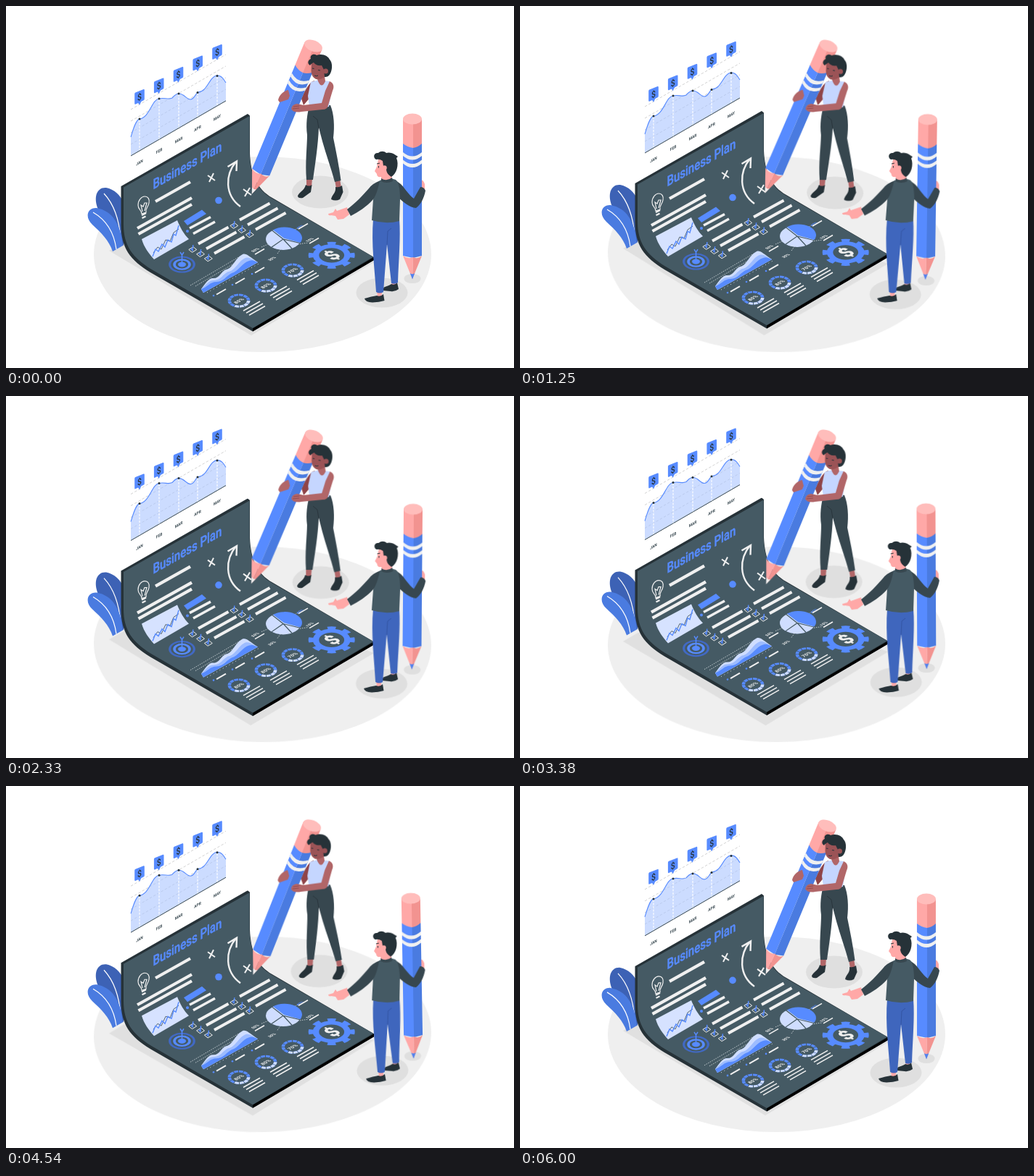
Recreate the animation shown at these times as an HTML page without scripts. Size 700x500 px, loop 6040 ms.

```html
<!DOCTYPE html>
<html lang="en">
<head>
<meta charset="utf-8">
<title>Business Plan</title>
<style>
html, body { margin: 0; width: 100%; height: 100%; overflow: hidden; background: #fff; }
svg { display: block; width: 700px; height: 500px; }
text { font-family: Roboto, "Liberation Sans", sans-serif; }
.blue { fill: #578bff; }
.deep { fill: #4a7be0; }
.pale { fill: #cfddff; }
.dark { fill: #263238; }
.slate { fill: #37474f; }
.skin { fill: #ffa8a7; }
.brown { fill: #b16668; }
.shade { fill: #dfdfdf; }
.ln { fill: none; stroke: #f0f0f0; }
.bl { fill: none; stroke: #578bff; }
.float { animation: float 6.04s linear infinite; }
.sway { animation: sway 6.04s linear infinite; }
#floor { transform-origin: 353.5px 343px; }
#woman { transform-origin: 405px 163px; }
#man { transform-origin: 512px 282px; }
@keyframes float { 50% { transform: translateY(-9.6px); } }
@keyframes sway { 25% { transform: rotate(1deg); } 75% { transform: rotate(-1deg); } }
</style>
</head>
<body>
<svg viewBox="0 0 700 500">
<defs>
  <g id="badge">
    <path class="blue" d="M-6.8-4.5Q-6.8-6-5.6-6.6L5.6-11Q6.8-11.300 6.800-10V2.300Q6.800 3.600 5.700 4.200L2.400 6 0 10.800-2 8-5.600 9.700Q-6.800 10.200-6.800 8.800Z"/>
    <text class="dark" transform="matrix(.866 -.4 0 1 0 4)" font-size="12" font-weight="500" text-anchor="middle">$</text>
  </g>
  <g id="pencil">
    <path fill="#ffa8a7" d="M-13 0H2V41Q-6 40-13 35Z"/>
    <path fill="#f29390" d="M1 0H13V35Q8 40 1 41Z"/>
    <ellipse rx="13" ry="7.6" fill="#ffbdbb"/>
    <path class="blue" d="M-13 34Q-7 39 1 40V192L-13 189Z"/>
    <path class="deep" d="M1 40Q8 39 13 34V189L1 192Z"/>
    <path id="band" fill="#f0f0f0" d="M-13 46Q0 57 13 46V51Q0 62-13 51Z"/>
    <use href="#band" y="10.5"/>
    <path fill="#ffa8a7" d="M-13 189Q-6 194 1 191L0 221Z"/>
    <path fill="#f29390" d="M1 191Q8 194 13 189L0 221Z"/>
    <path fill="currentColor" d="M-3.200 213Q0 215.500 3.200 213L0 221.500Z"/>
  </g>
  <g id="tick">
    <path class="ln" d="M-5.200 .5 1-3.300 5.700.5-.5 4.300Z"/>
    <path class="bl" stroke-width="1.500" d="M-2.500-1 0 1.500 .800-6"/>
  </g>
  <g id="checks">
    <use href="#tick"/><use href="#tick" x="10.800" y="6.200"/><use href="#tick" x="21.600" y="12.400"/>
    <path class="ln" stroke-width="4" d="M8-7.500 49.500-30.500M19-.8 60.500-23.800M30 5.700 71.500-17.300"/>
  </g>
  <g id="ring" transform="scale(1 .61)" fill="none" stroke-width="4.500">
    <circle r="13.200" stroke="#578bff" pathLength="12" stroke-dasharray=".85 .15"/>
    <circle r="13.200" stroke="#cfddff" pathLength="12" stroke-dasharray=".85 .15 .85 .15 .85 .15 .85 8.150"/>
  </g>
  <path id="notes" class="ln" stroke-width="1.500" d="M6 14 29 1M10 17 33 4M14 20 36 7.500"/>
  <g id="legend">
    <circle r="1.300" class="blue"/>
    <path class="ln" stroke-width="2" d="M4-1.500 17-9"/>
  </g>
</defs>

<g id="floor" class="sway">
  <ellipse cx="353.500" cy="343" rx="232.500" ry="135" fill="#efefef"/>
  <path fill="#e0e0e0" d="M142 338 161 327 300 270 507 354 338 455Z"/>
  <ellipse class="shade" cx="433" cy="257" rx="39" ry="22.500"/>
  <ellipse class="shade" cx="518" cy="396" rx="35.500" ry="20.500"/>
  <ellipse class="shade" cx="560" cy="376.500" rx="11.500" ry="6.600"/>
</g>

<g class="float">
  <!-- line chart -->
  <path fill="none" stroke="#cdcdcd" stroke-width=".9" stroke-dasharray="3.500 2.500" d="M172 191 303 115M172 175 303 99M172 159 303 83M172 143 303 67"/>
  <path fill="#aac5ff" fill-opacity=".6" d="M172 181C175 171 179 157 184 156 198 154 201 129 211 128 218 126 224 130 229 127 232 124 234 121 238 121 246 121 248 129 254 129 260 129 261 120 265 119 278 118 280 97 291 96 297 96 300 101 303 106V131L172 207Z"/>
  <path class="bl" stroke-width="1.100" d="M172 181C175 171 179 157 184 156 198 154 201 129 211 128 218 126 224 130 229 127 232 124 234 121 238 121 246 121 248 129 254 129 260 129 261 120 265 119 278 118 280 97 291 96 297 96 300 101 303 106"/>
  <path fill="none" stroke="#37474f" d="M172 207 303 131"/>
  <path fill="none" stroke="#fff" stroke-width="1.100" stroke-dasharray="3 1.500" d="M184 157V199M211 129V184M238 122V168M264 120V153M291 98V137"/>
  <g class="dark">
    <circle cx="184" cy="156" r="1.500"/><circle cx="211" cy="128" r="1.500"/><circle cx="238" cy="121" r="1.500"/><circle cx="264" cy="119.500" r="1.500"/><circle cx="291" cy="96.500" r="1.500"/>
  </g>
  <use href="#badge" x="184" y="126"/><use href="#badge" x="210.700" y="110.500"/><use href="#badge" x="237.500" y="95"/><use href="#badge" x="264.200" y="79.500"/><use href="#badge" x="291" y="64"/>
  <g class="slate" font-size="5.600" font-weight="700" text-anchor="middle">
    <text transform="matrix(.866 -.5 0 1 184 218)">JAN</text>
    <text transform="matrix(.866 -.5 0 1 211 202)">FEB</text>
    <text transform="matrix(.866 -.5 0 1 238 187)">MAR</text>
    <text transform="matrix(.866 -.5 0 1 264 171)">APR</text>
    <text transform="matrix(.866 -.5 0 1 291 156)">MAY</text>
  </g>

  <!-- leaves -->
  <path fill="#3d62b5" d="M162 331C145 318 137 301 127 281 120 264 125 250 138 251 149 253 158 261 164 275Z"/>
  <path fill="none" stroke="#fff" stroke-width="1.200" d="M135 259C149 274 156 294 158 322"/>
  <path class="deep" d="M147 339C142 324 131 313 119 302 108 292 112 278 125 279 146 283 158 300 161 331Z"/>
  <path fill="none" stroke="#fff" stroke-width="1.200" d="M120 285C139 296 149 314 152 336"/>

  <!-- sheet -->
  <path class="dark" d="M158.500 249 333 149 336 151.500V203C337 233 346 253 367 265L507 347V351L340 449.500 199 368C171 351 158.500 334 158.500 302Z"/>
  <path d="M340 445 507 347V351L340 449.500Z"/>
  <path fill="#455a64" d="M162 250.500 335.500 152V203C336.500 233 345 253 366 265.500L506 346.500 340 445 200 363.500C174 347 162 331 162 302Z"/>

  <text class="blue" stroke="#578bff" stroke-width=".5" transform="matrix(.78 -.44 0 1 202.500 253.500)" font-size="19.200" font-weight="500">Business Plan</text>
  <g class="ln" stroke-width="1.200">
    <path d="M187 287C187 281 182 282 182 275 182 268 187 263 191 263 196 263 198 267 197 272 196 278 192 279 193 285ZM188 284 186 275 189 277 191 272 194 272 191 283"/>
    <path stroke-width="2.200" d="M187 289 193 286M187.500 293 192.500 290.500"/>
    <path stroke-width="4.200" d="M206 270 254 243M181 307 256 265M182.500 315 256 274"/>
    <path stroke-width="2" d="M278 234 288 241M286 231 280 243M327 253 338 261M336 251 329 263"/>
    <path stroke-width="2.400" d="M323 277C301 261 302 233 317 215M305.500 222 318 214.500 317.500 228"/>
  </g>
  <circle class="blue" cx="293" cy="268.500" r="4.800"/>

  <path fill="#d6e2ff" d="M187 322 236 296C240 306 245 315 252 322L204 350C197 342 190 333 187 322Z"/>
  <path fill="none" stroke="#37474f" stroke-width=".8" d="M203 341 209 333 214 336 220 323 226 325 231 313 238 308"/>
  <path class="bl" stroke-width="1.400" d="M202 346 206 336 210 339 215 329 219 333 223 323 228 326 231 315 234 317 238 303"/>

  <path class="blue" d="M245 297 270 281.500 276 287 250 303Z"/>
  <circle class="blue" cx="250" cy="311" r="2"/>
  <path class="ln" stroke-width="3.500" d="M253 307 282 291.500M258 314.500 288 298"/>
  <use href="#checks" x="257" y="336"/>
  <use href="#checks" x="314" y="303"/>

  <g transform="translate(242.500 357) scale(1 .63)">
    <circle r="16.800" fill="none" stroke="#4169c4" stroke-width="3.200"/>
    <circle r="10.500" class="bl" stroke-width="3.600"/>
    <circle r="5.500" class="blue"/>
  </g>
  <path class="bl" stroke-width="1.500" d="M242.500 357V343M240 340 242.500 344 245 340"/>

  <path fill="none" stroke="#dfe5e8" stroke-width=".8" stroke-dasharray="1.500 1.500" d="M254 386 322 346M261 387 324 350"/>
  <path class="pale" d="M269 391C275 383 279 376 285 376 294 377 296 367 303 364 312 363 315 349 326 343 331 341 335 346 347 354L272 396Z"/>
  <path fill="#9dbcff" d="M269 391C276 385 279 379 286 379 296 379 299 370 306 367 316 366 321 351 330 348 336 346 340 351 347 354L272 396Z"/>
  <path class="blue" d="M269 391C278 388 281 381 290 381 300 381 304 372 311 369 320 367 326 354 335 352 340 350 343 353 347 354L272 396Z"/>
  <path fill="none" stroke="#dfe5e8" stroke-dasharray="1 4" d="M277 396 350 355"/>
  <use href="#legend" x="286" y="400"/><use href="#legend" x="312" y="385"/><use href="#legend" x="339" y="370"/>

  <path fill="none" stroke="#dfe5e8" stroke-width=".8" stroke-dasharray="1.500 1.500" d="M352 333 368 326M374 342 384 328M398 309 404 306M396 330 416 327"/>
  <g transform="translate(382 322) scale(1 .62)">
    <circle r="24" class="pale"/>
    <path class="blue" d="M1-2-14-20.500A24 24 0 0 1 23.500 8Z"/>
    <path fill="none" stroke="#455a64" stroke-width="1.600" d="M-15-19 0 0 23 9M0 0-16 18M0 0 12 21"/>
  </g>
  <g font-size="6" font-weight="700" text-anchor="middle" fill="#f0f0f0">
    <text transform="matrix(.8 -.46 .75 .43 345 338)">50%</text>
    <text transform="matrix(.8 -.46 .75 .43 368 350)">30%</text>
    <text transform="matrix(.8 -.46 .75 .43 420 324)">10%</text>
    <text class="blue" transform="matrix(.8 -.46 .75 .43 407 306)">40%</text>
  </g>
  <path class="ln" stroke-width="1.600" d="M343 343 356 335.500M418 328 431 320.500M403 308 416 300.500"/>

  <use href="#ring" transform="translate(321 407)"/>
  <use href="#ring" transform="translate(358 386)"/>
  <use href="#ring" transform="translate(395 365)"/>
  <g font-size="7.500" font-weight="700" text-anchor="middle" fill="#f0f0f0">
    <text transform="matrix(.8 -.46 .75 .43 323 408.500)">80%</text>
    <text transform="matrix(.8 -.46 .75 .43 360 387.500)">80%</text>
    <text transform="matrix(.8 -.46 .75 .43 397 366.500)">70%</text>
  </g>
  <use href="#notes" x="321" y="407"/><use href="#notes" x="358" y="386"/><use href="#notes" x="395" y="364.500"/>

  <g transform="translate(448.700 344.300) scale(1 .58)" class="bl">
    <circle r="21.700" stroke-width="8.600"/>
    <circle r="28.500" stroke-width="7" pathLength="16" stroke-dasharray="1 1" stroke-dashoffset=".5"/>
  </g>
  <text transform="matrix(.75 -.43 .75 .43 456.500 348.500)" font-size="28" font-weight="700" stroke="#f0f0f0" stroke-width=".6" text-anchor="middle" fill="#f0f0f0">$</text>
</g>

<g id="woman" class="sway">
  <path fill="#8f4448" d="M425 103C417 105 411 119 407 128L410 137 421 124Z"/>
  <use href="#pencil" transform="translate(423.500 55) rotate(22.500)" color="#f0f0f0"/>
  <path class="brown" d="M389 116C383 117 376 123 375 130L377 133 383 131 389 129 391 124Z"/>
  <path class="brown" d="M414 238H422L421 250H414ZM453 240 460 239 462 251 455 252Z"/>
  <path class="dark" d="M413 247Q417 250 421.500 247L420 257 409 265Q402 266 402 262C405 256 411 255 413 247ZM454 250Q459 251 463 248L464.500 257 460 267Q454 270 448 267C449 260 455 259 454 250Z"/>
  <path class="slate" d="M418 138 447 137C452 149 453 166 451 182 455 202 459 221 461.500 241L453 243C448 224 441 205 436 187L431 168C430 193 426 218 423 240L414 240C412 217 415 193 415 178 413 163 415 149 418 138Z"/>
  <path fill="none" stroke="#263238" stroke-width=".8" d="M431 169 429 157 423 152"/>
  <path fill="#c5d6ff" d="M420 105 431 102 446 104 448 119 445 139Q431 143 418 139L416 124Z"/>
  <path class="brown" d="M428 97H439L440 104Q435 115 430 104ZM446 104C451 106 453 111 450 117L444 137Q443 143 436 143L407 146Q396 148 393 142 394 136 401 135L410 137 435 134 440 117Z"/>
  <path fill="none" stroke="#8f4448" stroke-width=".8" d="M396 139 404 138M395 142 404 141"/>
  <path fill="#9b5356" d="M421 77 439 77 441 96Q434 103 427 101 421 98 420.500 90Z"/>
  <path class="dark" d="M419 82C414 79 417 74 420 73 418 68 424 65 428 68 436 65 444 69 446 74 450 78 450 87 447 93 445 97 443 98 439 98L438 88C437 86 436 84 435 82 430 83 426 81 424 78 422 79 420 80 419 82Z"/>
  <circle cx="440.500" cy="90" r="3.500" fill="#9b5356"/>
  <path fill="none" stroke="#263238" d="M422 86 424.500 86.500M430 88.500 433 89M425 96Q428 97.500 430 96"/>
</g>

<g id="man" class="sway">
  <path class="skin" d="M570 240Q575 239 577 246L577 254 568 255Z"/>
  <use href="#pencil" x="560" y="156" color="#4f82ef"/>
  <path class="skin" d="M511 394H518V402H512ZM531 380H538L539 387 532 388Z"/>
  <path class="dark" d="M511 400Q516 402 520 398L521.500 407Q514 409 505 409.500 495 409 494 404 504 401 511 400ZM531 384Q536 386 539 382L541 391Q536 395 530 394L519 393C518 387 526 388 531 384Z"/>
  <path fill="#3f66bd" d="M506 294H542C544 320 541 350 540 382Q536 385 531 383L525 329 520 395Q515 398 510 395C508 362 503 329 506 294Z"/>
  <path fill="none" stroke="#3353a0" stroke-width=".9" d="M525 330 526 311 531 307"/>
  <path class="skin" d="M470 278 456 283 454 280 451 285 444 287Q444 290 448 289L454 290 457 295 465 294 473 288Z"/>
  <path class="slate" d="M516 241 514 260 506 267C496 278 486 284 475 290L470 281C482 272 491 262 500 252Q505 245 516 241ZM536 240 544 246C550 252 554 260 562 266L571 250Q576 250 578 255C576 266 571 275 565 279 556 278 549 272 541 265Z"/>
  <path fill="#455a64" d="M515 241Q528 236 537 240 543 245 543 267L542 297Q524 302 504 296L506 267C511 260 513 250 515 241Z"/>
  <path class="skin" d="M513 212H528L532 238Q525 245 517 240V236Q511 237 511 232L508 228 511 222Z"/>
  <path class="slate" d="M517 238Q524 243 532 237L533 242Q524 246 517 242Z"/>
  <path class="dark" d="M510 212C505 209 507 202 513 203 516 200 521 200 524 203 530 201 536 205 540 208L538 210C542 219 538 232 531 236 526 233 524 229 524 225L520 221 519 214Q515 211 510 212Z"/>
  <circle class="skin" cx="521.500" cy="223.500" r="3.200"/>
  <path fill="none" stroke="#263238" d="M511 218 515 217M513.500 221V223.500"/>
</g>
</svg>
</body>
</html>
```
